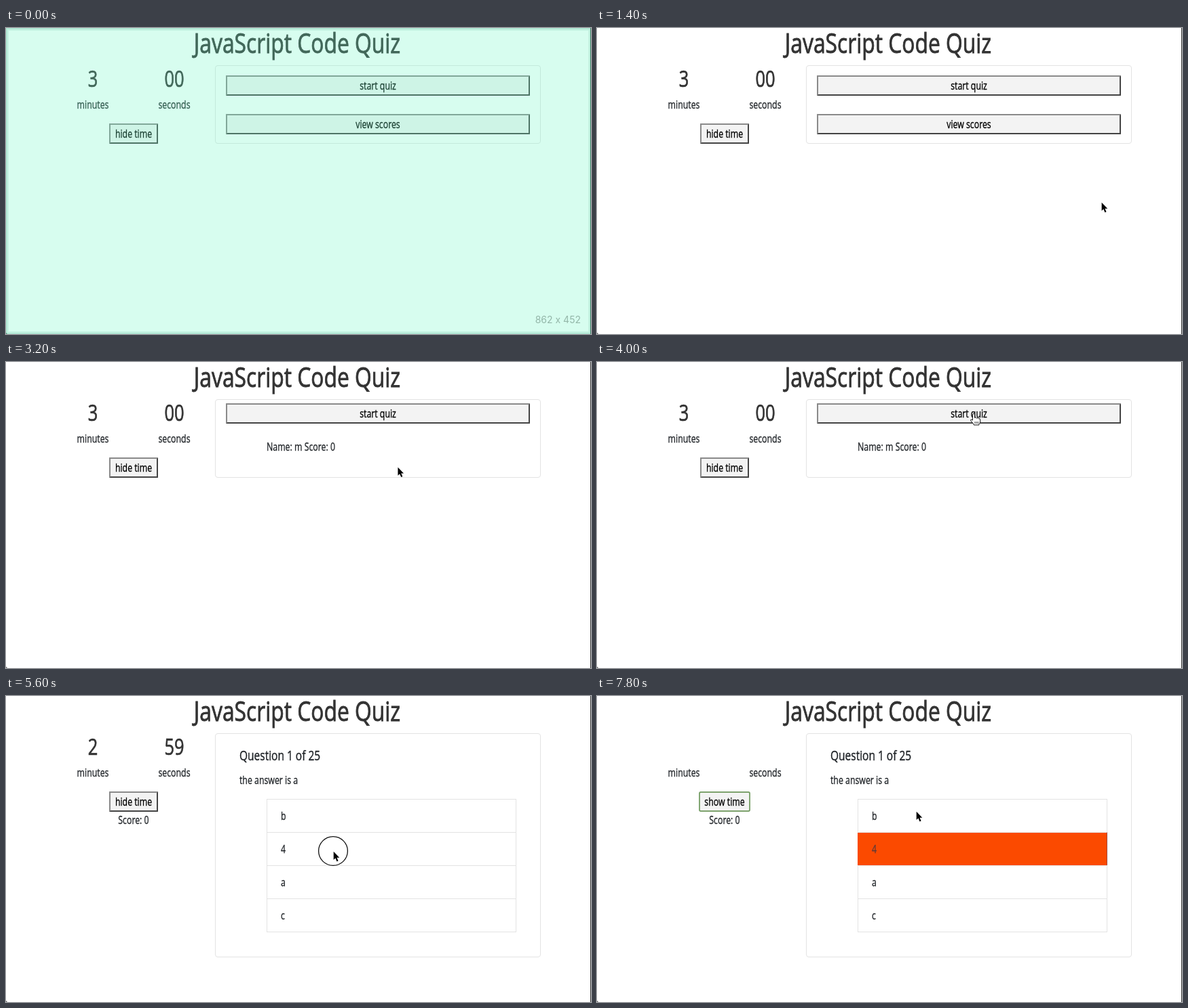
Recreate the animation shown at these times as an HTML page. Size 862 by 452 pixels, loop 8000 ms.

```html
<!DOCTYPE html>
<html lang="en">
<head>
<meta charset="utf-8">
<title>JavaScript Code Quiz</title>
<style>
  html, body { margin: 0; width: 100%; height: 100%; overflow: hidden; background: #fff; }
  svg { display: block; width: 862px; height: 452px; }
  text { font-family: "Open Sans", "Noto Sans", sans-serif; white-space: pre; }
  .size { font-family: Inter, sans-serif; font-size: 14px; fill: #93b6a8; }
</style>
</head>
<body>
<svg id="stage" viewBox="0 0 862 452"></svg>
<script>
const stage = document.getElementById('stage');
const W = 862, H = 452, LOOP = 8000, STEP = 100;
const CONDENSE = 0.795, BODY = 15.5, BUTTON_H = 30;
const INK = '#212529', LINE = '#e3e3e3';

// Moments when the page changes, in ms
const AT = {
  ready: 100, viewFocus: 2400, scores: 2600, startFocus: 4500, question: 4700,
  clock: 5000, wrong: 5700, penalty: 6000, hideFocus: 6800, hidden: 6900
};
const PRESSES = [4545, 5531, 6701];

// The pointer rests at each place until the next move begins
const ENTRY = { x: 655, y: 440 };
const MOVES = [
  { from: 400, to: 1300, x: 650, y: 360, bend: [-170, -250] },
  { from: 1300, to: 1700, x: 566, y: 108, bend: [150, -90] },
  { from: 2000, to: 2500, x: 574, y: 144, bend: [0, 0] },
  { from: 3000, to: 3900, x: 555, y: 76, bend: [8, 30] },
  { from: 4900, to: 5600, x: 482, y: 229, bend: [0, 0] },
  { from: 5900, to: 6600, x: 195, y: 153, bend: [0, 0] },
  { from: 7100, to: 7800, x: 470, y: 170, bend: [0, 45] }
];

const ease = k => k * k * (3 - 2 * k);
const mix = (a, b, k) => a + (b - a) * k;

function label(str, x, y, { size = BODY, fill = INK, anchor = 'start' } = {}) {
  return `<text transform="translate(${x} ${y}) scale(${CONDENSE} 1)" font-size="${size}" text-anchor="${anchor}"
    fill="${fill}" stroke="${fill}" stroke-width="${size * .022}">${str}</text>`;
}

const centred = (str, x, y, size, fill) => label(str, x, y, { size, fill, anchor: 'middle' });

function rect(x, y, w, h, attrs) {
  return `<rect x="${x}" y="${y}" width="${w}" height="${h}" ${attrs}/>`;
}

function button({ x, y, w, text, focus }) {
  const h = BUTTON_H;
  const border = focus
    ? rect(x + 1, y + 1, w - 2, h - 2, 'rx="2" fill="#f3f3f3" stroke="#a9c39d" stroke-width="2"') +
      rect(x + 1, y + 1, w - 2, h - 2, 'rx="2" fill="none" stroke="#6f985d" stroke-width="1.3"')
    : rect(x, y, w, h, 'fill="#f3f3f3"') +
      `<path d="M${x} ${y + h}v${-h}h${w}l-2 2h${4 - w}v${h - 4}z" fill="#8a8a8a"/>` +
      `<path d="M${x} ${y + h}h${w}v${-h}l-2 2v${h - 4}h${4 - w}z" fill="#444"/>`;
  return border + centred(text, x + w / 2, y + 21, BODY, '#000');
}

function buttonsAt(t) {
  const hidden = t >= AT.hidden;
  const list = [{
    x: hidden ? 150 : 152, y: 141, w: hidden ? 76 : 72,
    text: hidden ? 'show time' : 'hide time', focus: t >= AT.hideFocus
  }];
  const wide = { x: 324, w: 448 };
  if (t < AT.question) {
    list.push({ ...wide, y: t < AT.scores ? 70 : 61, text: 'start quiz', focus: t >= AT.startFocus });
  }
  if (t < AT.scores) {
    list.push({ ...wide, y: 127, text: 'view scores', focus: t >= AT.viewFocus });
  }
  return list;
}

function timer(t) {
  const minutes = t < AT.clock ? '3' : '2';
  const seconds = t < AT.clock ? '00' : t < AT.penalty ? '59' : '53';
  return [['minutes', minutes, 128], ['seconds', seconds, 248]].map(([unit, value, x]) =>
    centred(unit, x, 119) + (t < AT.hidden ? centred(value, x, 87, 32, '#333') : '')
  ).join('');
}

function question(t) {
  const left = 384, top = 152, width = 368, row = 49;
  let out = label('Question 1 of 25', 344, 95, { size: 19.5 }) +
    label('the answer is a', 344, 130) +
    centred('Score: 0', 188, 189);
  [...'b4ac'].forEach((answer, i) => {
    const y = top + row * i;
    const wrong = answer === '4' && t >= AT.wrong;
    out += rect(left + .5, y + .5, width - 1, row, `fill="#fff" stroke="${LINE}"`);
    out += label(answer, 405, y + 31, { fill: wrong ? '#5e3b38' : INK });
    if (wrong) {
      out += rect(left, y + 1, width, row, 'fill="#fb4a00"') +
        `<path d="M${left} ${y + row + .5}h${width - .5}v${-row}" fill="none" stroke="#a34d43"/>` +
        label(answer, 405, y + 31, { fill: '#5e3b38' });
    }
  });
  return out;
}

function pointerAt(t) {
  let at = ENTRY;
  for (const move of MOVES) {
    if (t <= move.from) break;
    const k = Math.min(1, (t - move.from) / (move.to - move.from));
    const arc = Math.sin(Math.PI * k);
    at = {
      x: mix(at.x, move.x, ease(k)) + move.bend[0] * arc,
      y: mix(at.y, move.y, ease(k)) + move.bend[1] * arc
    };
  }
  return at;
}

function pointer(t, { x, y }, buttons) {
  if (t <= MOVES[0].from) return '';
  const over = buttons.some(b => x >= b.x && x <= b.x + b.w && y >= b.y && y <= b.y + BUTTON_H);
  const shape = over
    ? `<path d="M-1.6 10V1.8Q-1.4 .4 0 .4T1.6 1.8V6.4Q3.4 4.8 4.6 7Q6.4 5.6 7.4 7.8Q9.6 7 9.7 9.2V12Q9.6 14 8 15.5V17H.2V16L-4.4 10.6Q-5 7.6 -1.6 10z" fill="#fff" stroke="#111"/>
       <path d="M2 12v3m2.2-3v3m2.2-3v3" stroke="#111" stroke-width=".8"/>`
    : '<path d="M.7 .7V13L3.4 10.5L5.5 15.4L7.6 14.5L5.5 9.7H9.3z" stroke="#fff" paint-order="stroke"/>';
  return `<g transform="translate(${x} ${y})" stroke-linejoin="round">${shape}</g>`;
}

function rings(t, { x, y }) {
  return PRESSES.map(press => t - press).filter(age => age > 0 && age < 160).map(age =>
    `<circle cx="${x}" cy="${y}" r="${age * .31}" fill="none" stroke="#111" stroke-width="1.3"/>`
  ).join('');
}

function resizeTint() {
  let out = rect(0, 0, W, H, 'fill="rgb(104,247,195)" fill-opacity=".265"');
  for (let width = 2; width <= 8; width += 3) {
    out += rect(0, 0, W, H, `fill="none" stroke="#3caa82" stroke-opacity=".1" stroke-width="${width}"`);
  }
  return out + '<text class="size" x="847" y="436" text-anchor="end">862 x 452</text>';
}

function draw(t) {
  const buttons = buttonsAt(t), at = pointerAt(t);
  const cardHeight = t < AT.question ? 115 : 330;
  let out = rect(0, 0, W, H, 'fill="#fff"') +
    `<path d="M${W - .5} 0V${H}" stroke="#333"/><path d="M0 ${H}v-2.5q.3 2.2 2.5 2.5z" fill="#444"/>` +
    centred('JavaScript Code Quiz', 429, 37, 40, '#333') +
    rect(308.5, 55.5, 479, cardHeight, `rx="3.5" fill="#fff" stroke="${LINE}"`) +
    timer(t) + buttons.map(button).join('');
  if (t >= AT.question) out += question(t);
  else if (t >= AT.scores) out += label('Name: m Score: 0', 384, 131);
  out += pointer(t, at, buttons) + rings(t, at);
  if (t < AT.ready) out += resizeTint();
  stage.innerHTML = out;
}

// The picture advances in steps and freezes while the question loads
function pictureTime(ms) {
  const t = Math.floor(ms % LOOP / STEP) * STEP;
  return t > AT.question && t < AT.clock ? AT.question : t;
}

const start = performance.now();
let shown = -1;
function tick(now) {
  const t = pictureTime(Math.max(0, now - start));
  if (t !== shown) draw(shown = t);
  requestAnimationFrame(tick);
}
tick(start);
</script>
</body>
</html>
```
